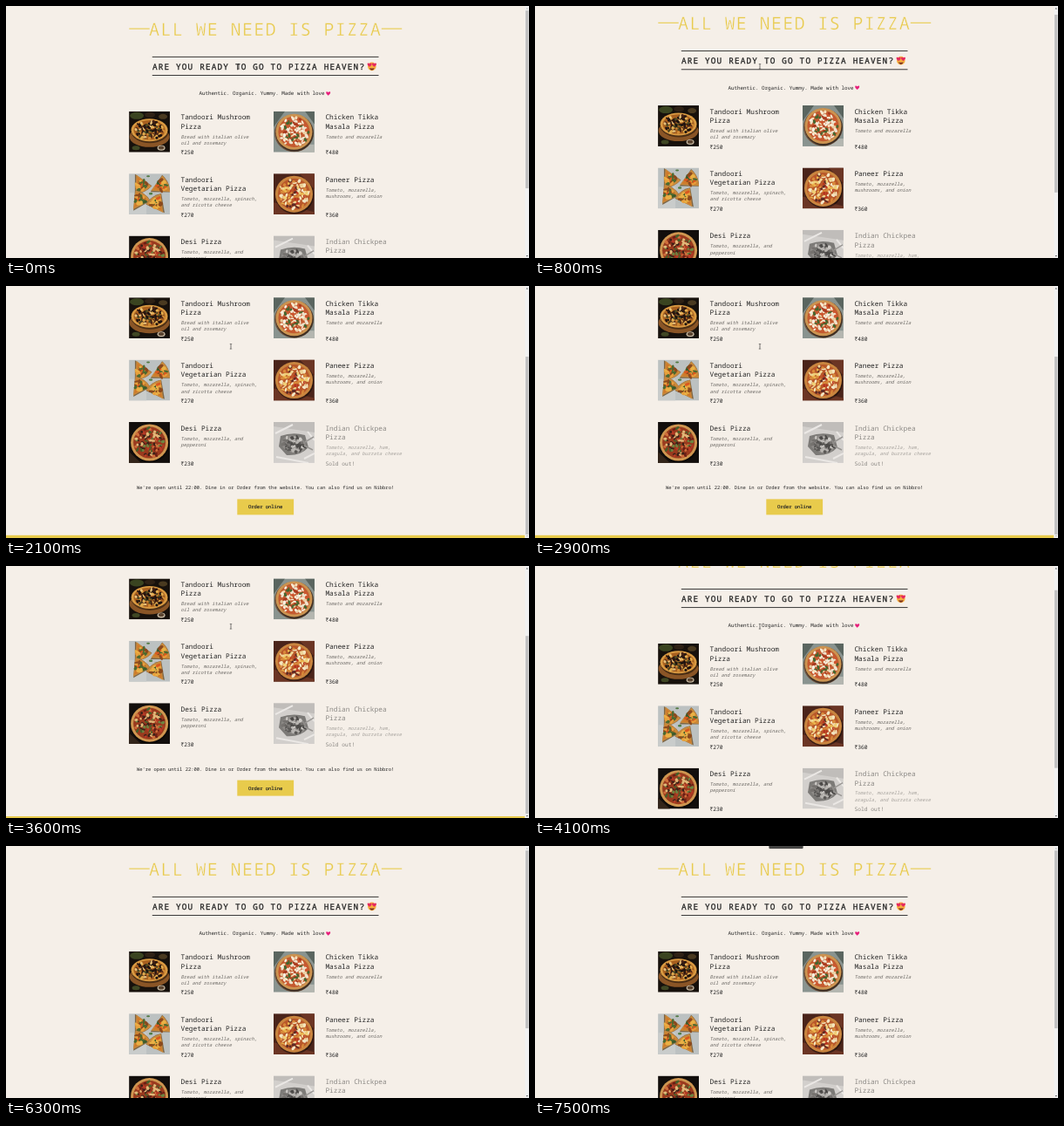
An HTML page for the animation above (7600 ms loop, 600 px wide and 289 px high).

```html
<!DOCTYPE html>
<html lang="en">
<head>
<meta charset="utf-8">
<title>Pizza menu</title>
<style>
  html, body { margin: 0; width: 100%; height: 100%; overflow: hidden; background: #f5efe8; }
  svg { display: block; width: 600px; height: 289px; }
  text { font-family: 'Roboto Mono', 'Noto Sans Mono', 'DejaVu Sans Mono', monospace;
         fill: #252525; white-space: pre; text-rendering: geometricPrecision; }
  /* A background-coloured outline lightens the title; a dark one gives medium weight. */
  .title { font-size: 20.31px; font-weight: 300; letter-spacing: 1.17px; fill: #e8ca4b;
           stroke: #f5efe8; stroke-width: .4px; }
  .heading { font-size: 9.375px; letter-spacing: 1.17px; stroke: #252525; stroke-width: .3px; }
  .intro { font-size: 5.86px; }
  .name { font-size: 7.8125px; }
  .desc { font-size: 5.42px; font-weight: 300; font-style: italic; fill: #6b6864; }
  .price { font-size: 6.25px; }
  .small { font-size: 5.48px; }
  .button { font-size: 5.47px; stroke: #252525; stroke-width: .15px; }
  .sold text { fill: #8b8884; }
  .sold .desc { fill: #a5a19c; }
</style>
</head>
<body>
<svg id="stage" viewBox="0 0 600 289"></svg>
<script>
const LOOP = 7600, MAX_SCROLL = 107.6, YELLOW = '#e8cb4c', PHOTO = 46.9;
const HEART = 'M0 2.8C-5 -.7 -2.6 -3.8 0 -1.6C2.6 -3.8 5 -.7 0 2.8Z';
const stage = document.getElementById('stage');

const rect = (x, y, w, h, fill, extra = '') =>
  `<rect x="${x}" y="${y}" width="${w}" height="${h}" fill="${fill}" ${extra}/>`;
const ellipse = (x, y, rx, ry, fill, extra = '') =>
  `<ellipse cx="${x}" cy="${y}" rx="${rx}" ry="${ry}" fill="${fill}" ${extra}/>`;
const path = (d, fill, extra = '') => `<path d="${d}" fill="${fill}" ${extra}/>`;
const text = (x, y, cls, content) => `<text x="${x}" y="${y}" class="${cls}">${content}</text>`;
const group = (attrs, ...parts) => `<g ${attrs}>${parts.join('')}</g>`;

function randomFrom(seed) {
  return () => (seed = seed * 16807 % 2147483647) / 2147483647;
}

// Toppings spread along a sunflower spiral with a little jitter.
function toppings(count, rx, ry, colors, seed) {
  const random = randomFrom(seed);
  let out = '';
  for (let i = 0; i < count; i++) {
    const r = Math.sqrt((i + .5) / count), a = i * 2.4 + random() * .6;
    const x = (Math.cos(a) * r * rx).toFixed(1), y = (Math.sin(a) * r * ry).toFixed(1);
    out += ellipse(x, y, (1.3 + random() * 1.7).toFixed(1), (.8 + random() * 1.1).toFixed(1),
      colors[Math.floor(random() * colors.length)],
      `transform="rotate(${Math.round(random() * 180)} ${x} ${y})"`);
  }
  return out;
}

function pizza(x, y, rx, ry, crust, sauce, colors, seed) {
  return group(`transform="translate(${x} ${y})"`,
    ellipse(.6, 1.4, rx + .6, ry + .6, '#000', 'opacity=".45"'),
    ellipse(0, 0, rx, ry, crust),
    ellipse(0, 0, rx * .86, ry * .86, sauce),
    toppings(85, rx * .8, ry * .8, colors, seed));
}

function wedge(x, y, turn, seed) {
  return group(`transform="translate(${x} ${y}) rotate(${turn}) scale(1.2)"`,
    path('M-9 -7Q0 -11 9 -7L1 10Z', '#7d6647'),
    path('M-8.5 -7Q0 -10.5 8.5 -7L0 9Z', '#c98a3c'),
    path('M-6.5 -6H6.5L0 7Z', '#cf7a2a'),
    group('transform="translate(0 -2.5)"',
      toppings(20, 5.5, 4.5, ['#3d5a2c', '#d9581f', '#e9b145', '#4c6a30', '#e8a03c', '#8a4a1e'], seed)));
}

const photos = [
  () => rect(0, 0, PHOTO, PHOTO, '#17110c') +
    ellipse(9, 5, 8, 4, '#3a4420') + ellipse(24, 4, 6, 3, '#2e2115') + ellipse(39, 6, 5, 3, '#4a3a20') +
    ellipse(23.5, 29, 23, 12, '#8a5526') +
    pizza(23.5, 21.5, 21, 13, '#d99a42', '#a8601f',
      ['#2a1710', '#e2ac4d', '#4d2616', '#4a4a22', '#d08a35', '#1c1210', '#e8c078'], 17) +
    ellipse(37, 42, 4.5, 3, '#c9bba5') + ellipse(37, 41.7, 3.2, 2, '#5a4430') +
    ellipse(8, 42, 4.5, 2.5, '#3f4724'),
  () => rect(0, 0, PHOTO, PHOTO, '#89938f') +
    path('M0 0H13L0 18ZM47 0V15L36 0Z', '#5a655f') + rect(27, 38, 20, 9, '#b4b6b0') +
    ellipse(23.5, 25, 22.5, 21.5, '#6f5440') +
    pizza(23.5, 23.5, 21, 20.5, '#cc9350', '#c45a30',
      ['#f6ead2', '#a93a20', '#44662f', '#f4dfb8', '#efe3cc', '#d0552f', '#e9cda0', '#f7f0e0'], 31),
  () => rect(0, 0, PHOTO, PHOTO, '#bcc1c1') + rect(0, 22, 20, 25, '#c9cccb') +
    wedge(13, 11, 155, 5) + wedge(35, 15, 65, 23) + wedge(11, 32, 35, 47) + wedge(33, 36, -35, 61) +
    ellipse(25, 23, 2.2, 1.2, '#4d7b3e') + ellipse(22, 3, 2, 1, '#527a42'),
  () => rect(0, 0, PHOTO, PHOTO, '#4a241a') + path('M0 33L47 44V47H0ZM30 0H47V18Z', '#6b3524') +
    pizza(23.5, 23.5, 21.5, 21, '#c9853f', '#b9582a',
      ['#f5e6bd', '#f0cf77', '#b8321f', '#f3e5c4', '#5e2b25', '#eab44d', '#f0d79a', '#d98a3a'], 73),
  () => rect(0, 0, PHOTO, PHOTO, '#120e0c') + path('M0 34L14 47H0Z', '#33251a') +
    pizza(23.5, 23.5, 21.5, 21, '#cf9650', '#9a3a1e',
      ['#b83a26', '#46602a', '#e0b878', '#6a1f16', '#6d8440', '#d0703c', '#3a2218'], 97),
  () => rect(0, 0, PHOTO, PHOTO, '#d2cfcc') + path('M0 0H47V12L0 5Z', '#c0bdba') +
    path('M3 40L40 47M2 13L22 3M39 11L47 21M35 42L47 36', 'none', 'stroke="#ebe8e5" stroke-width="2"') +
    path('M8 16Q22 11 36 15L40 29Q31 39 15 38L6 28Z', '#7c7a77') +
    group('transform="translate(23 25.5) rotate(12)"',
      ellipse(0, 0, 14, 10, '#8f8c89'),
      toppings(50, 13, 9, ['#5a5856', '#b8b5b1', '#75726f', '#cecbc7', '#4c4a48'], 41)) +
    path('M36 23L46 17M35 27L45 32', 'none', 'stroke="#9a9794" stroke-width="1.5"'),
];

const menu = [
  { name: ['Tandoori Mushroom', 'Pizza'], desc: ['Bread with italian olive', 'oil and rosemary'], price: '₹250' },
  { name: ['Chicken Tikka', 'Masala Pizza'], desc: ['Tomato and mozarella'], price: '₹480' },
  { name: ['Tandoori', 'Vegetarian Pizza'], desc: ['Tomato, mozarella, spinach,', 'and ricotta cheese'], price: '₹270' },
  { name: ['Paneer Pizza'], desc: ['Tomato, mozarella,', 'mushrooms, and onion'], price: '₹360' },
  { name: ['Desi Pizza'], desc: ['Tomato, mozarella, and', 'pepperoni'], price: '₹230' },
  { name: ['Indian Chickpea', 'Pizza'], desc: ['Tomato, mozarella, ham,', 'aragula, and burrata cheese'], price: 'Sold out!', sold: true },
];

function menuItem({ name, desc, price, sold }, i) {
  const x = 141.1 + (i % 2) * 165.9, y = 120.8 + Math.floor(i / 2) * 71.4, left = 59.4;
  const descTop = 20.5 + (name.length - 1) * 10.3;
  return group(`transform="translate(${x} ${y})" class="${sold ? 'sold' : ''}"`,
    group('clip-path="url(#photo)"', photos[i]()),
    ...name.map((line, n) => text(left, 9.6 + n * 10.3, 'name', line)),
    ...desc.map((line, n) => text(left, descTop + n * 7.2, 'desc', line)),
    text(left, 49.6, 'price', price));
}

const heart = (x, y, scale, fill) =>
  path(HEART, fill, `transform="translate(${x} ${y}) scale(${scale})"`);

const emoji = ellipse(419.8, 69.4, 4.8, 4.8, '#f5ae3e') +
  path('M417 71Q419.8 72 422.6 71Q422 73.8 419.8 73.8Q417.6 73.8 417 71Z', '#7a2f22') +
  heart(417.1, 67.4, .85, '#e62a5e') + heart(422.5, 67.4, .85, '#e62a5e');

const page = [
  rect(141.3, 25.5, 23.4, 1.1, YELLOW), rect(430.8, 25.5, 23.4, 1.1, YELLOW),
  text(164.1, 34.2, 'title', 'ALL WE NEED IS PIZZA'),
  rect(167.8, 57.9, 259.7, .9, '#252525'), rect(167.8, 79.1, 259.7, .9, '#252525'),
  text(167.9, 72.8, 'heading', 'ARE YOU READY TO GO TO PIZZA HEAVEN?'), emoji,
  text(221.4, 102.3, 'intro', 'Authentic. Organic. Yummy. Made with love'),
  heart(369.7, 100.3, .85, '#e7207c'),
  ...menu.map(menuItem),
  text(149.9, 340.9, 'small',
    "We're open until 22:00. Dine in or Order from the website. You can also find us on Nibbro!"),
  rect(265.3, 352, 64.8, 18, YELLOW),
  text(278, 363, 'button', 'Order online'),
  rect(0, 393.4, 595.4, 3.2, YELLOW),
];

stage.innerHTML =
  `<defs><clipPath id="photo">${rect(0, 0, PHOTO, PHOTO, '#000')}</clipPath></defs>` +
  rect(0, 0, 600, 289, '#f5efe8') +
  group('id="page"', ...page) +
  rect(595.4, 0, 4.6, 289, '#f1f1f1') +
  rect(596, 5.2, 3.6, 203.9, '#c1c1c1', 'id="thumb"') +
  path('M596.6 3.4L597.8 1.9L599 3.4Z', '#505050', 'id="arrowUp"') +
  path('M596.6 286L597.8 287.5L599 286Z', '#505050', 'id="arrowDown"') +
  path('M-1.2 -2.8H-.3L0 -2.5L.3 -2.8H1.2M0 -2.5V2.5M-1.2 2.8H-.3L0 2.5L.3 2.8H1.2',
    'none', 'id="cursor" stroke="#222" stroke-width=".6"') +
  group('id="tab"', rect(268, -5.6, 40, 9, '#000', 'rx="1.5" opacity=".15"'),
    rect(268.5, -6, 39, 9, '#454443', 'rx="1.2"'));

const part = Object.fromEntries(
  ['page', 'thumb', 'arrowUp', 'arrowDown', 'cursor', 'tab'].map(id => [id, document.getElementById(id)]));

const progress = (t, from, to) => Math.min(1, Math.max(0, (t - from) / (to - from)));
const smooth = u => u * u * (3 - 2 * u);
const move = (el, x, y) => el.setAttribute('transform', `translate(${x.toFixed(2)} ${y.toFixed(2)})`);
const show = (el, visible) => el.setAttribute('visibility', visible ? 'visible' : 'hidden');

function render(t) {
  const down = smooth(progress(t, 700, 1910) ** .757);
  const up = smooth(progress(t, 3590, 4660) ** .606);
  const scroll = MAX_SCROLL * (down - up);
  move(part.page, 0, -scroll);
  move(part.thumb, 0, scroll * .705);
  part.arrowUp.setAttribute('fill', scroll > .1 ? '#505050' : '#b5b5b5');
  part.arrowDown.setAttribute('fill', scroll < MAX_SCROLL - .1 ? '#505050' : '#b5b5b5');
  move(part.cursor, 267 - 9 * smooth(progress(t, 50, 400)), 69.3);
  show(part.cursor, t < 4700);
  move(part.tab, 0, -4 * (1 - progress(t, 7400, 7500)));
  show(part.tab, t > 7400);
}

const start = performance.now();
function tick() {
  render((performance.now() - start) % LOOP);
  requestAnimationFrame(tick);
}
tick();
</script>
</body>
</html>
```
